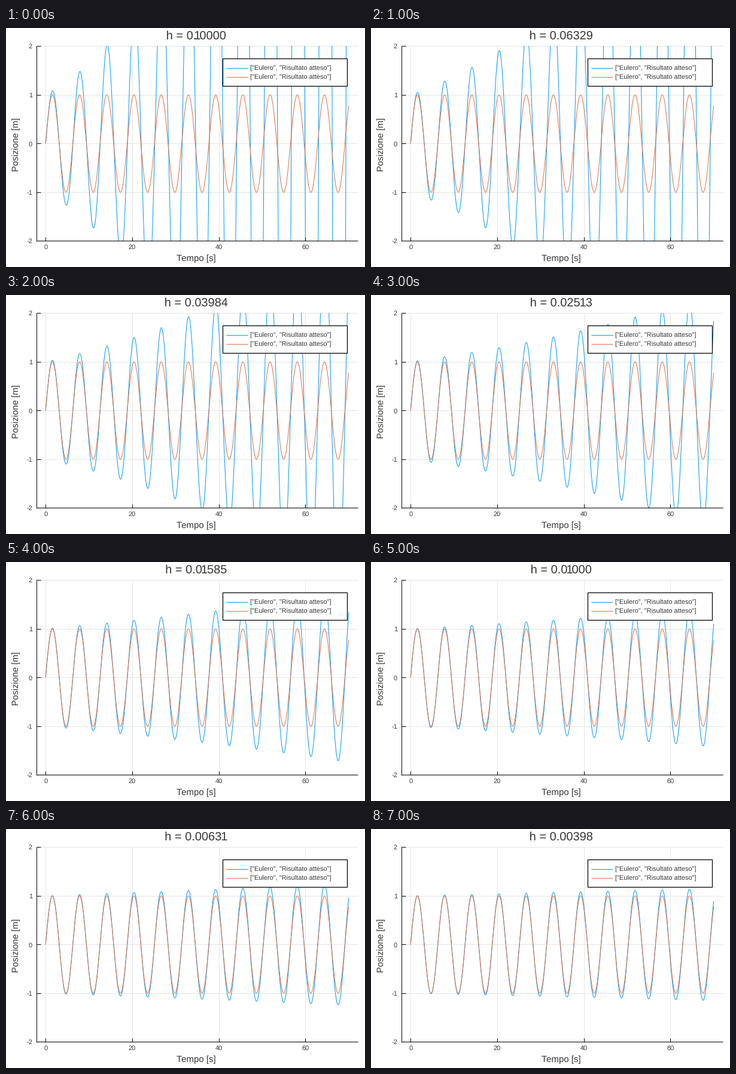
Write a matplotlib script that moves like this. It is 600x400 px and loops after 8000 ms.

```python
import numpy as np
import matplotlib.pyplot as plt
from matplotlib.animation import FuncAnimation
from matplotlib.patches import PathPatch, Rectangle
from matplotlib.path import Path
from matplotlib.textpath import TextPath

W, H, DPI = 600, 400, 100
LEFT, RIGHT, TOP, BOTTOM = 51, 588, 30.4, 356.4
BLUE, RED, INK = "#009afa", "#e36f47", "#363636"
T_END = 70
STEPS = [7 * round(10 ** (2 + 0.2 * k)) for k in range(8)]

plt.rcParams["font.family"] = "Liberation Sans"
plt.rcParams["text.hinting"] = "none"
plt.rcParams["text.hinting_factor"] = 1

fig = plt.figure(figsize=(W / DPI, H / DPI), dpi=DPI, facecolor="white")
ax = fig.add_axes([0, 0, 1, 1])
ax.set_xlim(0, W)
ax.set_ylim(H, 0)
ax.axis("off")


def px(t):
    return LEFT + (t + 2.1) / 74.2 * (RIGHT - LEFT)


def py(v):
    return TOP + (2 - v) / 4 * (BOTTOM - TOP)


def line(xs, ys, color, width=1.0, z=2):
    return ax.plot(xs, ys, color=color, lw=width * 72 / DPI, zorder=z,
                   solid_capstyle="butt")[0]


def write(x, y, s, size, ha="center", **kw):
    ax.text(x, y, s, fontsize=size * 72 / DPI, color=INK, ha=ha,
            va="baseline", zorder=8, **kw)


# Grid, ticks and tick labels
for t in (0, 20, 40, 60):
    x = px(t)
    line([x, x], [TOP, BOTTOM], "#e5e5e5", z=1)
    line([x, x], [BOTTOM, BOTTOM - 6], "black", z=5)
    write(x, 370, str(t), 11.1)
for v in (-2, -1, 0, 1, 2):
    y = py(v)
    line([LEFT, RIGHT], [y, y], "#e5e5e5", z=1)
    line([LEFT, LEFT + 7], [y, y], "black", z=5)
    write(44, y + 4, str(v), 11.1, ha="right")
line([LEFT, LEFT], [TOP, BOTTOM + 0.5], "black", z=5)
line([LEFT, RIGHT], [BOTTOM, BOTTOM], "black", z=5)

write(318, 390, "Tempo [s]", 15.3)
write(21, 194.5, "Posizione [m]", 15.3, rotation=90, rotation_mode="anchor")

# Legend
ax.add_patch(Rectangle((362, 51), 208, 45.5, fc="white", ec="black",
                       lw=0.9, zorder=6))
for y, color in ((66.5, BLUE), (81.5, RED)):
    line([368, 404], [y, y], color, z=7)
    write(408.5, y + 4.5, '["Eulero", "Risultato atteso"]', 10.6, ha="left")

# Curves
clip = Rectangle((LEFT, TOP), RIGHT - LEFT, BOTTOM - TOP,
                 transform=ax.transData)
euler = line([], [], BLUE, z=3)
exact_t = np.linspace(0, T_END, 2000)
exact = line(px(exact_t), py(np.sin(exact_t)), RED, z=4)
for curve in (euler, exact):
    curve.set_clip_path(clip)

# Title, laid out glyph by glyph so that the digit 1 sits tight
ADVANCE = {".": 0.278, " ": 0.278, "=": 0.584}
KERN = {".1": -0.2, "01": -0.1, "10": -0.1}
title = ax.add_patch(PathPatch(Path([(0, 0)]), fc=INK, lw=0, zorder=8))


def title_path(s, cx, base, size=20):
    x, glyphs = 0, []
    for a, b in zip(s, s[1:] + " "):
        if a != " ":
            glyph = TextPath((0, 0), a, size=size)
            glyphs.append(Path(glyph.vertices * [1, -1] + [x, base],
                               glyph.codes))
        tight = -0.05 if "1" in a + b and b != " " else 0
        x += size * (ADVANCE.get(a, 0.556) + KERN.get(a + b, tight))
    path = Path.make_compound_path(*glyphs)
    return Path(path.vertices + [cx - x / 2, 0], path.codes)


def draw(i):
    n = STEPS[i]
    h = T_END / n
    k = np.arange(n + 1)
    # Closed form of the explicit Euler steps for x'' = -x
    x = (1 + h * h) ** (k / 2) * np.sin(k * np.arctan(h))
    euler.set_data(px(k * h), py(x))
    title.set_path(title_path(f"h = {h:.5f}", 317.8, 19))
    return euler, title


anim = FuncAnimation(fig, draw, frames=len(STEPS), interval=1000,
                     repeat=True, repeat_delay=0)
plt.show()
```
